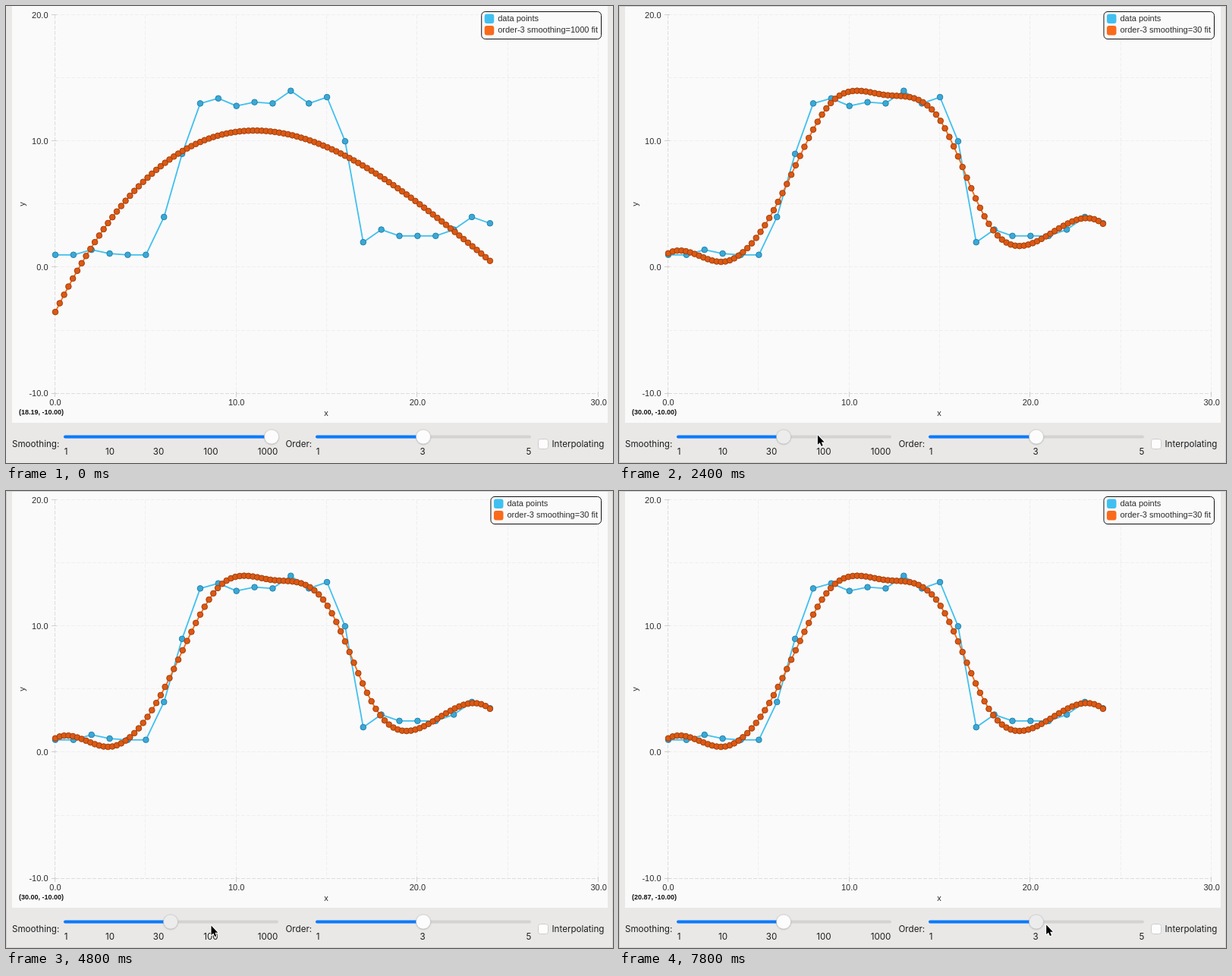
Animation of 800x602 px, one loop 8 s. Source, as an HTML page with a canvas:

```html
<!DOCTYPE html>
<html lang="en">
<head>
<meta charset="utf-8">
<title>Spline smoothing</title>
<style>
  html, body { margin: 0; width: 100%; height: 100%; overflow: hidden; background: #e9e8e7; }
  canvas { display: block; }
</style>
</head>
<body>
<canvas id="stage" width="800" height="602"></canvas>
<script>
const ctx = document.getElementById('stage').getContext('2d');
const PLOT_FONT = '11px "Liberation Sans", Arial, sans-serif';
const UI_FONT = '11.6px Inter, sans-serif';
const BLUE = '#40c0f0', ORANGE = '#f96a1a';

const data = [1, 1, 1.4, 1.1, 1, 1, 4, 9, 13, 13.4, 12.8, 13.1, 13,
              14, 13, 13.5, 10, 2, 3, 2.5, 2.5, 2.5, 3, 4, 3.5];
const LAST = data.length - 1;
const smoothings = [1, 10, 30, 100, 1000];

// --- Smoothing cubic spline: adaptive knots, then a penalty on third-derivative jumps ---
const scale = x => x / 12 - 1;

function basis(x, knots) {
  const u = scale(x);
  return [1, u, u * u, u ** 3, ...knots.map(k => Math.max(0, u - scale(k)) ** 3)];
}

function solve(A, b) {
  const n = b.length;
  for (let c = 0; c < n; c++) {
    let pivot = c;
    for (let r = c + 1; r < n; r++) if (Math.abs(A[r][c]) > Math.abs(A[pivot][c])) pivot = r;
    [A[c], A[pivot]] = [A[pivot], A[c]];
    [b[c], b[pivot]] = [b[pivot], b[c]];
    for (let r = c + 1; r < n; r++) {
      const f = A[r][c] / A[c][c];
      for (let k = c; k < n; k++) A[r][k] -= f * A[c][k];
      b[r] -= f * b[c];
    }
  }
  for (let r = n - 1; r >= 0; r--) {
    for (let k = r + 1; k < n; k++) b[r] -= A[r][k] * b[k];
    b[r] /= A[r][r];
  }
  return b;
}

function leastSquares(knots, penalty) {
  const rows = data.map((_, i) => basis(i, knots));
  const size = knots.length + 4;
  const A = Array.from({ length: size }, (_, i) => Array.from({ length: size }, (_, j) =>
    rows.reduce((sum, row) => sum + row[i] * row[j], i === j && i > 3 ? penalty : 0)));
  const b = Array.from({ length: size }, (_, i) =>
    rows.reduce((sum, row, k) => sum + row[i] * data[k], 0));
  const coef = solve(A, b);
  const curve = x => basis(x, knots).reduce((sum, v, i) => sum + v * coef[i], 0);
  const squares = data.map((y, i) => (curve(i) - y) ** 2);
  return { curve, squares, error: squares.reduce((a, v) => a + v, 0) };
}

function fitSpline(target) {
  let knots = [], added = 0, previous = 0;
  let fit = leastSquares(knots, 0);
  while (fit.error > target && knots.length < 18) {
    const gain = previous - fit.error;
    const wanted = gain > target * 0.001
      ? Math.floor(added * (fit.error - target) / gain) : added * 2;
    added = added ? Math.min(added * 2, Math.max(wanted, added >> 1, 1)) : 1;
    previous = fit.error;

    const ends = [0, ...knots, LAST];
    const spans = ends.slice(1).map((end, i) => {
      const start = ends[i];
      let error = 0;
      for (let k = start; k <= end; k++) {
        const shared = (k === start && k > 0) || (k === end && k < LAST);
        error += fit.squares[k] * (shared ? 0.5 : 1);
      }
      return { start, count: end - start - 1, error };
    });
    for (let i = 0; i < added; i++) {
      const open = spans.filter(s => s.count > 0);
      if (!open.length) break;
      const worst = open.reduce((a, s) => s.error > a.error ? s : a);
      const { start, count, error } = worst;
      const half = (count >> 1) + 1;
      knots.push(start + half);
      Object.assign(worst, { count: half - 1, error: error * (half - 1) / count });
      spans.push({ start: start + half, count: count - half, error: error * (count - half) / count });
    }
    knots.sort((a, b) => a - b);
    fit = leastSquares(knots, 0);
  }
  if (!knots.length) return fit.curve;

  let low = -12, high = 6;
  for (let i = 0; i < 45; i++) {
    const mid = (low + high) / 2;
    fit = leastSquares(knots, 10 ** mid);
    if (fit.error < target) low = mid; else high = mid;
  }
  return fit.curve;
}

// --- Drawing ---
const px = x => 65 + x * 23.87;
const py = y => 344.4 - y * 16.62;

const dataPoints = data.map((y, x) => [px(x), py(y)]);
const fits = smoothings.map((s, index) => {
  if (index === 0) return [];
  const curve = fitSpline(s);
  return Array.from({ length: 100 }, (_, i) => {
    const x = i * LAST / 99;
    return [px(x), py(curve(x))];
  });
});

function text(str, x, y, align = 'left', font = PLOT_FONT, color = '#2b2b2b') {
  ctx.font = font;
  ctx.textAlign = align;
  ctx.fillStyle = color;
  ctx.fillText(str, x, y);
}

function line(x1, y1, x2, y2, color, dash = []) {
  ctx.setLineDash(dash);
  ctx.strokeStyle = color;
  ctx.lineWidth = 1;
  ctx.beginPath();
  ctx.moveTo(x1, y1);
  ctx.lineTo(x2, y2);
  ctx.stroke();
  ctx.setLineDash([]);
}

function box(x, y, w, h, r, fill, stroke) {
  ctx.beginPath();
  ctx.roundRect(x, y, w, h, r);
  ctx.fillStyle = fill;
  ctx.fill();
  if (stroke) {
    ctx.strokeStyle = stroke;
    ctx.lineWidth = 1;
    ctx.stroke();
  }
}

function series(points, color, fill, edge) {
  ctx.strokeStyle = color;
  ctx.lineWidth = 1.8;
  ctx.lineJoin = 'round';
  ctx.beginPath();
  points.forEach(p => ctx.lineTo(...p));
  ctx.stroke();
  ctx.fillStyle = fill;
  ctx.strokeStyle = edge;
  ctx.lineWidth = 1;
  for (const [x, y] of points) {
    ctx.beginPath();
    ctx.arc(x, y, 3.8, 0, 7);
    ctx.fill();
    ctx.stroke();
  }
}

function drawAxes() {
  box(8, 0, 785, 549, 0, '#fafafa');
  for (let v = 0; v <= 30; v += 5) {
    const x = Math.round(px(v)) - 0.5, y = Math.round(py(v - 10)) - 0.5;
    line(x, 12, x, 510, v ? '#efefef' : '#dddddd', [5, 2]);
    line(65, y, 781, y, v ? '#efefef' : '#dddddd', [5, 2]);
    if (v % 10 === 0) {
      line(x, 508, x, 515, '#cfcfcf');
      line(60, y, 67, y, '#cfcfcf');
      text(v.toFixed(1), px(v), 526, 'center');
      text((v - 10).toFixed(1), 55.5, py(v - 10) + 3.5, 'right');
    }
  }
  text('x', 422, 540, 'center');
  ctx.save();
  ctx.translate(25, 261);
  ctx.rotate(-Math.PI / 2);
  text('y', 0, 0, 'center');
  ctx.restore();
}

function drawLegend(smoothing) {
  const label = `order-3 smoothing=${smoothing} fit`;
  ctx.font = PLOT_FONT;
  const x = 780 - ctx.measureText(label).width;
  box(x - 21.5, 7.5, 806 - x, 36, 5, '#fafafa', '#111111');
  box(x - 17.5, 10.5, 12.5, 12.5, 3, BLUE);
  box(x - 17.5, 26, 12.5, 12.5, 3, ORANGE);
  text('data points', x, 19.5);
  text(label, x, 35);
}

function drawSlider(left, right, knob, pressed) {
  box(left, 565.5, right - left, 4, 2, '#d4d3d2');
  box(left, 565.5, knob - left, 4, 2, '#087aff');
  ctx.save();
  ctx.shadowColor = 'rgba(0,0,0,.3)';
  ctx.shadowBlur = 2;
  ctx.shadowOffsetY = 0.5;
  box(knob - 9.5, 558, 19, 19, 9.5, pressed ? '#ececec' : '#fcfcfc');
  ctx.restore();
  ctx.strokeStyle = '#cbcbcb';
  ctx.lineWidth = 0.6;
  ctx.stroke();
}

function drawControls(level, smoothingPressed, orderPressed) {
  const label = (str, x, y, align) => text(str, x, y, align, UI_FONT, '#1c1c1c');
  label('Smoothing:', 8, 581);
  label('Order:', 368.5, 581);
  label('Interpolating', 719.5, 581);
  const centers = [79, 137, 201, 270, 345];
  smoothings.forEach((s, i) => label(s, centers[i], 590.5, 'center'));
  [[1, 411], [3, 549], [5, 689]].forEach(([n, x]) => label(n, x, 590.5, 'center'));
  drawSlider(76, 359, 84 + 66.5 * level, smoothingPressed);
  drawSlider(408, 692, 550, orderPressed);
  box(701.5, 570.5, 13, 13, 3, '#fdfdfd', '#cdcccb');
}

function drawCursor(x, y) {
  const shape = [[0, 0], [0, 12.5], [2.8, 10], [4.8, 14.6], [6.8, 13.7], [4.9, 9.2], [8.7, 9.2]];
  ctx.beginPath();
  shape.forEach(([dx, dy]) => ctx.lineTo(x + dx, y + dy));
  ctx.closePath();
  ctx.strokeStyle = '#ffffff';
  ctx.lineWidth = 2;
  ctx.stroke();
  ctx.fillStyle = '#000000';
  ctx.fill();
}

// --- Timeline ---
const PERIOD = 8000, STEP = 200;
const GRAB = 1400, RELEASE = 6400, GRAB_ORDER = 7400;
const cursorPath = [ // time, x, y
  [0, 499, 618], [200, 499, 612], [1200, 350, 568], [1400, 348, 568], [3200, 193, 563],
  [3800, 181, 572], [4400, 181, 572], [5200, 360, 573], [5600, 389, 574], [5800, 389, 574],
  [6200, 240, 568], [6400, 235, 564], [6600, 365, 553], [7200, 551, 567],
  [7400, 552, 568], [7800, 563.2, 571.5], [8000, 563.2, 571.5]];

function cursorAt(t) {
  const next = cursorPath.findIndex(key => key[0] > t);
  const [t0, x0, y0] = cursorPath[next - 1], [t1, x1, y1] = cursorPath[next];
  const f = (t - t0) / (t1 - t0);
  return [x0 + (x1 - x0) * f, y0 + (y1 - y0) * f];
}

function sliderLevel(t) {
  if (t < GRAB) return 4;
  if (t >= RELEASE) return 2;
  return Math.max(0, Math.min(4, Math.floor((cursorAt(t)[0] - 84) / 66.5)));
}

function draw(now) {
  const t = Math.floor(now % PERIOD / STEP) * STEP;
  const [cx, cy] = cursorAt(t);
  const level = sliderLevel(t);
  const trackedX = t < GRAB ? 18.19 : t < GRAB_ORDER ? 30 : (cx - 65) / 23.87;

  box(0, 0, 800, 602, 0, '#e9e8e7');
  drawAxes();
  series(dataPoints, BLUE, '#3ca8d6', '#2583ab');
  series(fits[level], ORANGE, '#dc5914', '#9f3f0c');
  drawLegend(smoothings[level]);
  text(`(${trackedX.toFixed(2)}, -10.00)`, 17, 538, 'left',
    'bold 9px "Liberation Sans", Arial, sans-serif', '#111111');
  drawControls(level, t >= GRAB && t < RELEASE, t >= GRAB_ORDER);
  if (t >= GRAB) {
    ctx.strokeStyle = '#d2d1d0';
    ctx.lineWidth = 1;
    ctx.strokeRect(0.5, 0.5, 799, 601);
  }
  drawCursor(cx, cy);
}

function loop() {
  draw(performance.now());
  requestAnimationFrame(loop);
}
loop();
</script>
</body>
</html>
```
